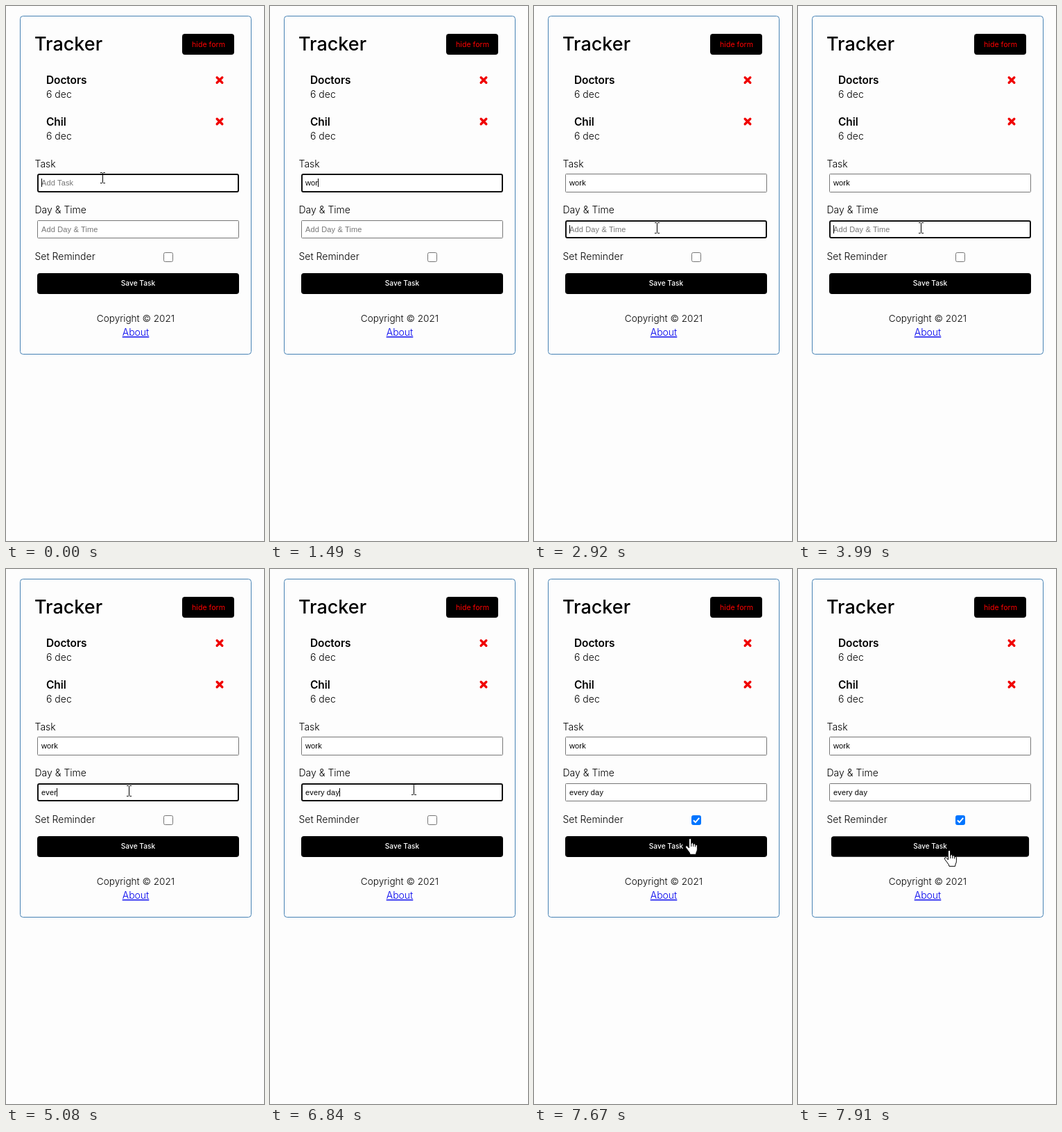
Write an HTML page that moves like this. It is 372 by 769 pixels and loops after 8 s.

```html
<!DOCTYPE html>
<html lang="en">
<head>
<meta charset="utf-8">
<title>Tracker form</title>
<style>
  html, body { margin: 0; width: 100%; height: 100%; overflow: hidden; background: #fdfdfd; }
  svg { display: block; width: 372px; height: 769px; }
  text { font: 300 14px Inter, sans-serif; white-space: pre; }
  .title { font-size: 27px; font-weight: 500; }
  .task { font-size: 15.5px; font-weight: 600; letter-spacing: -.1px; }
  .small { font-size: 10.6px; font-weight: 400; }
  .save { font-size: 10.2px; font-weight: 500; fill: #fff; }
  .mid { text-anchor: middle; }
  .entry { font: 400 11px "Liberation Sans", Arial, sans-serif; letter-spacing: .15px; }
  .cross { stroke: #f00000; stroke-width: 3.4; stroke-linecap: round; }
  .cursor { stroke: #000; fill: #fff; stroke-width: 1; display: none; }
</style>
</head>
<body>
<svg viewBox="0 0 372 769">
  <rect x="20.5" y="14.5" width="333" height="486" rx="4" fill="none" stroke="steelblue"/>
  <text class="title" x="41" y="64">Tracker</text>
  <rect x="254" y="40" width="75" height="30" rx="4"/>
  <text class="small mid" x="292" y="58.5" fill="#f00">hide form</text>

  <text class="task" x="58" y="112">Doctors</text>
  <text x="58" y="132">6 dec</text>
  <path class="cross" d="M304.2 102.7l7.6 7.6m0-7.6l-7.6 7.6"/>
  <text class="task" x="58" y="172">Chil</text>
  <text x="58" y="192">6 dec</text>
  <path class="cross" d="M304.2 162.2l7.6 7.6m0-7.6l-7.6 7.6"/>

  <text x="41.5" y="232">Task</text>
  <text x="41.5" y="298">Day &amp; Time</text>
  <text x="41.5" y="365">Set Reminder</text>
  <g id="fields"></g>

  <rect id="box" x="227.5" y="354.5" width="13" height="13" rx="2"/>
  <path id="tick" d="M230 361.2l2.8 2.9 5.4-6.2" fill="none" stroke="#fff" stroke-width="2"/>

  <g id="save">
    <rect x="45" y="384" width="291" height="30" rx="4"/>
    <text class="save mid" x="190.5" y="402.4">Save Task</text>
  </g>

  <text class="mid" x="187" y="454" style="font-size:13.6px">Copyright © 2021</text>
  <text class="mid" x="187" y="474" fill="#0000ee" text-decoration="underline">About</text>

  <path class="cursor" id="beam" fill="none" style="fill:none"
        d="M-3.5-7.5h2.5l1 1 1-1h2.5M0-6.5v13M-3.5 7.5h2.5l1-1 1 1h2.5"/>
  <path class="cursor" id="arrow" d="M.5.5v15.6l3.6-3.5 2.7 5.9 2.4-1-2.6-5.8h5z"/>
  <path class="cursor" id="hand"
        d="M-1.5 14V2q0-1.7 1.6-1.7T1.7 2v6q.2-1.4 1.6-1.4T4.8 8v1q.3-1.2 1.5-1.2T7.7 9.200v1q.3-.9 1.4-.9t1.300 1.500v5q0 2.500-1.200 4.200l-.7 3.300H0l-.8-2.600-5.500-7.400q-1-1.600.2-2.300 1.300-.7 2.700.8zM1.700 8v4M4.800 9v3M7.700 10v2.500"/>
</svg>
<script>
const LOOP = 8000, BLINK = 530;
const $ = id => document.getElementById(id);
const NS = 'http://www.w3.org/2000/svg';

function add(parent, tag, attrs) {
  const el = document.createElementNS(NS, tag);
  for (const key in attrs) el.setAttribute(key, attrs[key]);
  return parent.appendChild(el);
}

function makeField(y, height, hint, word, keys, focusAt, blurAt) {
  return {
    y, height, hint, word, keys, focusAt, blurAt,
    frame: add($('fields'), 'rect', { fill: '#fff' }),
    label: add($('fields'), 'text', { class: 'entry', x: 51, y: y + 17 }),
    caret: add($('fields'), 'rect', { y: y + 7, width: 1, height: 12 })
  };
}

// keys: the moment each letter is typed
const fields = [
  makeField(241, 27, 'Add Task', 'work', [450, 1180, 1490, 1740], 0, 2920),
  makeField(308, 26, 'Add Day & Time', 'every day',
    [4440, 4690, 4870, 5080, 5310, 5400, 5640, 5700, 6470], 2920, 7430)
];

// time, pointer, x, y
const moves = [
  [0, 'beam', 139.5, 247], [850, '', 0, 0],
  [2530, 'beam', 139.5, 247], [2590, 'arrow', 156, 276], [2650, 'arrow', 172, 308],
  [2740, 'beam', 175.5, 317], [2800, 'beam', 177.5, 319],
  [6840, 'beam', 207.5, 317], [6900, 'beam', 216.5, 324], [6990, 'arrow', 224, 340],
  [7050, 'arrow', 229, 350], [7110, 'arrow', 232, 357], [7200, 'arrow', 234, 361],
  [7290, 'arrow', 234, 362],
  [7500, 'arrow', 233, 366], [7570, 'arrow', 230, 375], [7640, 'hand', 225, 387],
  [7700, 'hand', 221, 396], [7760, 'hand', 219, 402], [7820, 'hand', 218, 404]
];

function drawField(f, t) {
  const focused = t >= f.focusAt && t < f.blurAt;
  const line = focused ? 2 : 1;
  const typed = f.keys.filter(k => k <= t);
  const rect = {
    x: 45 + line / 2, y: f.y + line / 2, width: 291 - line, height: f.height - line,
    rx: focused ? 2 : 1, 'stroke-width': line, stroke: focused ? '#101010' : '#767676'
  };
  for (const key in rect) f.frame.setAttribute(key, rect[key]);

  f.label.textContent = typed.length ? f.word.slice(0, typed.length) : f.hint;
  f.label.setAttribute('fill', typed.length ? '#000' : '#757575');
  const end = typed.length ? Math.round(f.label.getComputedTextLength()) : 0;
  f.caret.setAttribute('x', 51 + end);
  const since = t - (typed.length ? typed[typed.length - 1] : f.focusAt);
  const lit = Math.floor(since / BLINK) % 2 === 0;
  f.caret.style.display = focused && lit ? 'inline' : 'none';
}

function draw(t) {
  fields.forEach(f => drawField(f, t));

  const [, kind, x, y] = moves.filter(m => m[0] <= t).pop();
  for (const name of ['beam', 'arrow', 'hand']) {
    $(name).style.display = name === kind ? 'inline' : 'none';
    $(name).setAttribute('transform', `translate(${x} ${y})`);
  }

  const checked = t >= 7430;
  $('box').setAttribute('fill', checked ? '#0075ff' : '#fff');
  $('box').setAttribute('stroke', checked ? '#0075ff' : '#767676');
  $('tick').style.display = checked ? 'inline' : 'none';

  const press = t >= 7910 ? .98 : 1;
  $('save').setAttribute('transform',
    `translate(190.5 399) scale(${press}) translate(-190.5 -399)`);
}

const start = performance.now();
function loop(now) {
  draw(Math.max(0, now - start) % LOOP);
  requestAnimationFrame(loop);
}
draw(0);
requestAnimationFrame(loop);
</script>
</body>
</html>
```
